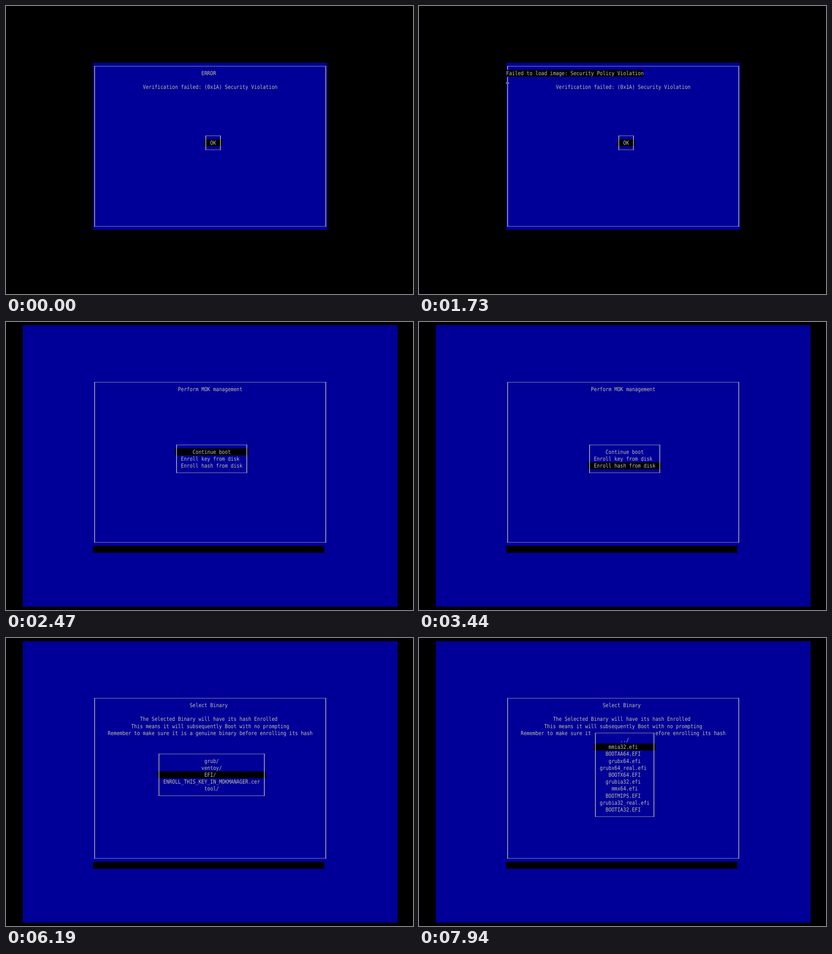
An HTML page that plays this animation: 890x629 px, repeating every 8 s.

```html
<!DOCTYPE html>
<html lang="en">
<head>
<meta charset="utf-8">
<title>Key management console</title>
<style>
  html, body { margin: 0; width: 100%; height: 100%; overflow: hidden; background: #000; }
  svg { display: block; width: 890px; height: 629px; }
  text {
    font: 13.3px "DejaVu Sans Mono", "Liberation Mono", monospace;
    fill: #c2c0a6; white-space: pre; text-rendering: geometricPrecision;
  }
  .scene, #pointer { visibility: hidden; }
  .scene.on, #pointer.on { visibility: visible; }
  .blue { fill: #000098; }
  .black { fill: #000; }
  .line { fill: #b6b5a8; }
  .lit { fill: #c0c0bc; }
  #pointer { fill: #fff; stroke: #000; stroke-width: 1; }
</style>
</head>
<body>
<svg viewBox="0 0 890 629">
  <g id="console" transform="translate(190.5 124) scale(.8)"></g>
  <path id="pointer" d="M.5 .5V16.5L4.2 13L6.8 18.4L9 17.4L6.5 12.2H11.8Z"/>
</svg>
<script>
const LOOP = 8000, COLS = 80, CELL_W = 8, CELL_H = 19;
const stage = document.getElementById('console');
const pointer = document.getElementById('pointer');

function add(parent, tag, attrs) {
  const node = document.createElementNS('http://www.w3.org/2000/svg', tag);
  for (const key in attrs) node.setAttribute(key, attrs[key]);
  return parent.appendChild(node);
}

function rect(g, cls, x, y, width, height) {
  add(g, 'rect', { class: cls, x, y, width, height });
}

function cells(g, cls, col, row, cols, rows) {
  rect(g, cls, col * CELL_W, row * CELL_H, cols * CELL_W, rows * CELL_H);
}

// Every character sits in its own console cell.
function print(g, str, row, col = Math.floor((COLS - str.length) / 2), cls = '') {
  const x = [...str].map((_, i) => (col + i) * CELL_W).join(' ');
  const transform = `translate(0 ${row * CELL_H + 14.8}) scale(1 1.14)`;
  add(g, 'text', { x, class: cls, transform }).textContent = str;
}

function frame(g, col, row, cols, rows) {
  const x = col * CELL_W + 3, y = row * CELL_H + 9;
  const w = (cols - 1) * CELL_W, h = (rows - 1) * CELL_H;
  rect(g, 'line', x, y, w + 2, 1);
  rect(g, 'line', x, y + h, w + 2, 1);
  rect(g, 'line', x, y, 2, h + 1);
  rect(g, 'line', x + w, y, 2, h + 1);
}

function menu(g, items, selected) {
  const inner = Math.max(...items.map(s => s.length));
  const cols = inner + 4, rows = items.length + 2;
  const col = Math.floor((COLS + 2 - cols) / 2);
  const row = 11 - Math.floor(items.length / 2) - (items.length === 1 ? 1 : 0) + shift(items.length);
  cells(g, 'blue', col, row, cols, rows);
  cells(g, 'black', col, row + 1 + selected, cols, 1);
  frame(g, col, row, cols, rows);
  items.forEach((s, i) => print(g, s, row + 1 + i,
    col + 2 + Math.floor((inner - s.length) / 2), i === selected ? 'lit' : ''));
}

// Odd and even lists round differently around the middle row.
function shift(count) {
  return count === 1 ? 0 : count % 2 ? -1 : 0;
}

function errorBox(g) {
  cells(g, 'blue', 0, 0, COLS, 24);
  frame(g, 0, 0, COLS, 24);
  print(g, 'ERROR', 1);
  print(g, 'Verification failed: (0x1A) Security Violation', 3);
  menu(g, ['OK'], 0);
}

function loadFailure(g) {
  const message = 'Failed to load image: Security Policy Violation';
  errorBox(g);
  cells(g, 'black', 0, 1, message.length, 1);
  print(g, message, 1, 0, 'lit');
  rect(g, 'line', 0, 54, 8, 3);
  rect(g, 'blue', 3, 54, 2, 3);
}

function page(g, title, lines = []) {
  rect(g, 'blue', -192, -146, 1024, 768);
  cells(g, 'black', 0, 24, COLS - 1, 1);
  frame(g, 0, 0, COLS, 24);
  print(g, title, 1);
  lines.forEach((s, i) => print(g, s, 3 + i));
}

function countdown(g) {
  page(g, 'Shim UEFI key management');
  print(g, 'Press any key to perform MOK management', 12);
  print(g, 'Booting in 10 seconds', 22, 2);
}

const manage = selected => g => {
  page(g, 'Perform MOK management');
  menu(g, ['Continue boot', 'Enroll key from disk', 'Enroll hash from disk'], selected);
};

const browse = (items, selected) => g => {
  page(g, 'Select Binary', [
    'The Selected Binary will have its hash Enrolled',
    'This means it will subsequently Boot with no prompting',
    'Remember to make sure it is a genuine binary before enrolling its hash'
  ]);
  menu(g, items, selected);
};

const volumes = ['VTOYEFI'];
const root = ['grub/', 'ventoy/', 'EFI/', 'ENROLL_THIS_KEY_IN_MOKMANAGER.cer', 'tool/'];
const efi = ['../', 'BOOT/'];
const boot = ['../', 'mmia32.efi', 'BOOTAA64.EFI', 'grubx64.efi', 'grubx64_real.efi',
  'BOOTX64.EFI', 'grubia32.efi', 'mmx64.efi', 'BOOTMIPS.EFI', 'grubia32_real.efi',
  'BOOTIA32.EFI'];

const scenes = [
  [0, errorBox],
  [1730, loadFailure],
  [1830, countdown],
  [2470, manage(0)],
  [3230, manage(1)],
  [3440, manage(2)],
  [4100, browse(volumes, 0)],
  [5030, browse(root, 0)],
  [5700, browse(root, 1)],
  [6190, browse(root, 2)],
  [6520, browse(efi, 0)],
  [7050, browse(efi, 1)],
  [7380, browse(boot, 0)],
  [7940, browse(boot, 1)]
].map(([start, draw]) => {
  const node = add(stage, 'g', { class: 'scene' });
  draw(node);
  return { start, node };
});

function movePointer(t) {
  pointer.classList.toggle('on', t >= 70 && t < 550);
  const step = Math.max(0, Math.min(5, Math.floor((t - 70) / 66)));
  const left = (1 - step / 5) ** 2;
  pointer.setAttribute('transform', `translate(${469 + 335 * left} ${297 + 279 * left})`);
}

function render(now) {
  const t = now % LOOP;
  const current = scenes.findLast(s => t >= s.start);
  for (const s of scenes) s.node.classList.toggle('on', s === current);
  movePointer(t);
}

const begin = performance.now();
function tick() {
  render(performance.now() - begin);
  requestAnimationFrame(tick);
}
tick();
</script>
</body>
</html>
```
